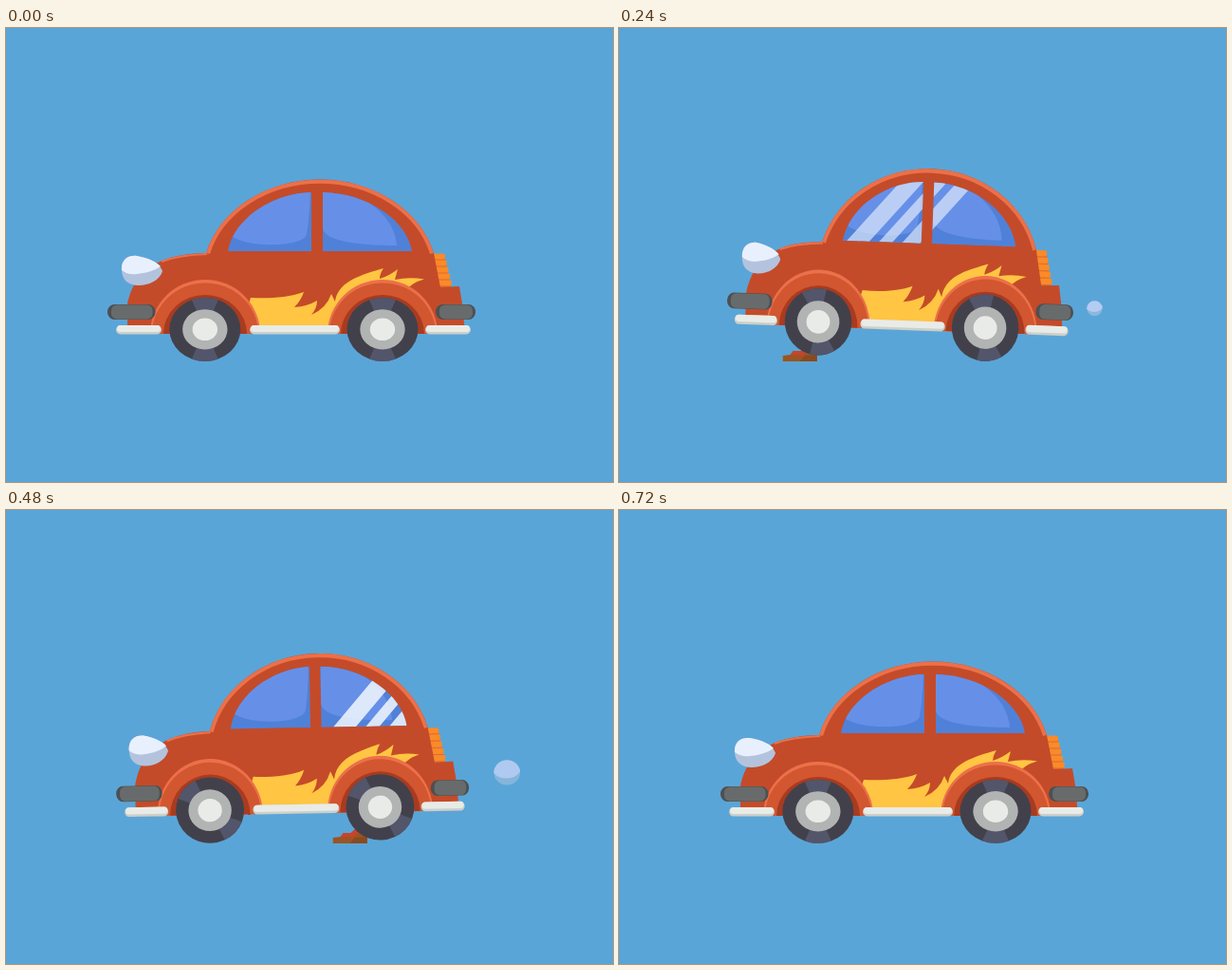
Write an HTML page that moves like this. It is 640 px wide and 478 px high and loops after 0.75 s.

```html
<!DOCTYPE html>
<html lang="en">
<head>
<meta charset="utf-8">
<title>Bumpy ride</title>
<style>
html, body { margin: 0; width: 100%; height: 100%; overflow: hidden; background: #5aa5d7; }
svg { display: block; width: 100%; height: 100%; }
</style>
</head>
<body>
<svg viewBox="0 0 640 478">
  <defs>
    <clipPath id="glass">
      <path d="M234 235C240 200 282 174 322 173V235Z"/>
      <path d="M334 173C382 174 423 203 428 235H334Z"/>
    </clipPath>
    <clipPath id="ball"><circle r="1"/></clipPath>
    <g id="tyre">
      <circle r="37.5" fill="#42414b"/>
      <path d="M0 0L34.8 -14A37.5 37.5 0 0 1 34.8 14ZL-34.8 -14A37.5 37.5 0 0 0 -34.8 14Z" fill="#53556b"/>
    </g>
    <g id="hub">
      <circle r="23.7" fill="#b2b4b3"/>
      <circle r="13.2" fill="#e9ebe9"/>
    </g>
    <g id="fender">
      <path d="M-58 0A58 57 0 0 1 58 0Z" fill="#ec7049"/>
      <path d="M-56 0A56 53.5 0 0 1 56 0Z" fill="#d2562f"/>
      <path d="M-44 0A44 41 0 0 1 44 0Z" fill="#a83b20"/>
    </g>
  </defs>

  <rect width="640" height="478" fill="#5aa5d7"/>

  <g id="puff">
    <g clip-path="url(#ball)">
      <circle id="puffLow" r="1"/>
      <ellipse id="puffTop" cx="-.05" cy="-.4" rx="1.1" ry=".85"/>
    </g>
  </g>

  <g id="rock">
    <path d="M0 15V9L8 8L11 4L19 4L23 0H31L36 8V15Z" fill="#9a5522"/>
    <path d="M23 9L36 8V15H18Z" fill="#8a4a1e"/>
    <path d="M7 9L11 4L19 4L23 1L28 2L21 9L13 8Z" fill="#c8442c"/>
  </g>

  <g id="car">
    <g id="vents"></g>
    <path d="M128 322V290C133 268 146 238 211 237A124 103.5 0 0 1 451 237L458 273L478 272L481 290L484 322Z" fill="#c44b29"/>
    <path d="M213 237.500A122 101.5 0 0 1 449 237.500" fill="none" stroke="#ec7049" stroke-width="4"/>
    <path d="M164 246Q182 239 212 238" fill="none" stroke="#ec7049" stroke-width="2"/>

    <g clip-path="url(#glass)">
      <rect x="230" y="170" width="200" height="66" fill="#5081d8"/>
      <path d="M230 170H321Q320 200 317 217C315 230 262 232 241 221L230 215Z" fill="#6690e8"/>
      <path d="M334 170H352C388 181 410 203 412 229C380 229 336 226 334 211Z" fill="#6690e8"/>
      <path id="shine" fill="#f4f8ff"/>
    </g>

    <path d="M248 315L258 284C276 285 298 284 314 278Q311 287 304 294Q318 293 328 287Q328 295 322 302Q338 295 343 280L347 288C350 268 370 261 398 253Q394 259 394 264Q404 261 413 254L410 265Q425 262 441 264.500Q428 268 422 276L400 300L355 315Z" fill="#ffc543"/>

    <use href="#fender" x="210" y="322"/>
    <use href="#fender" x="397" y="322"/>

    <path d="M122 255C121 244 129 239 138 240C152 242 163 249 165 256C162 266 150 271 140 271C128 271 122 264 122 255Z" fill="#b3c3de"/>
    <path d="M122 255C121 244 129 239 138 240C150 242 160 247 163 251C154 257 146 258 138 259Q128 260 122 255Z" fill="#e9f0fd"/>

    <g id="sills"></g>
    <g class="wheel" transform="translate(209.800 317.300) scale(1 .893)"><use href="#tyre"/><use href="#hub"/></g>
    <g class="wheel" transform="translate(397 317.300) scale(1 .893)"><use href="#tyre"/><use href="#hub"/></g>
    <g id="bumpers"></g>
  </g>
</svg>
<script>
const LOOP = 750, STEP = 30, RIDE = 720;
const MID = 303.25, AXLE = 317.25, BASE = 187.2;
const $ = id => document.getElementById(id);
const clamp = v => Math.min(1, Math.max(0, v));

// Bell curve around a moment
const bump = (t, mid, width) => Math.exp(-(((t - mid) / width) ** 2));

const mix = (a, b, k) => `rgb(${a.map((c, i) => Math.round(c + (b[i] - c) * k))})`;

const bar = (x, y, w, h, r, fill) =>
  `<rect x="${x}" y="${y}" width="${w}" height="${h}" rx="${r}" fill="${fill}"/>`;

// Diagonal band given by its left and right edge on the lower window line
const band = (l, r) => `M${l} 235H${r}L${r + 66} 165H${l + 66}Z`;

const sill = (x, w) =>
  bar(x, 313, w, 9.5, 4.7, "#cccfca") + bar(x + 1, 313, w - 2, 7, 3.5, "#e9ebe7");
const bumper = (x, w) =>
  bar(x, 291, w, 16, 7.5, "#4c5052") + bar(x + 4, 291.5, w - 7, 15, 6, "#686b6b");

function vents() {
  let s = '<path d="M446 238H462L469 273H450Z" fill="#de6a2a"/>';
  for (let i = 0; i < 5; i++) s += bar(446 + i * 1.7, 237.5 + i * 7, 17, 6, 1.5, "#fa8a2a");
  return s;
}

$("sills").innerHTML = sill(116, 48) + sill(257, 95) + sill(442, 48);
$("bumpers").innerHTML = bumper(107, 50.5) + bumper(453, 42);
$("vents").innerHTML = vents();

const tyres = document.querySelectorAll(".wheel use:first-child");

function drawCar(t) {
  // Stretch up in mid ride; each axle is thrown up as it meets the rock
  const stretch = Math.sin(Math.PI * (t / RIDE) ** 0.85) ** 2;
  const sx = 1 - 0.066 * stretch, sy = 1 + 0.054 * stretch;
  const front = bump(t, 268, 80), rear = bump(t, 550, 80);
  const x = MID - 6 * front + 3 * rear;
  const y = AXLE - 33.5 * (sy - 1) - 3.6 * (front + rear);
  const tilt = Math.atan2(7.2 * (front - rear), BASE * sx) * 180 / Math.PI;
  $("car").setAttribute("transform",
    `translate(${x} ${y}) rotate(${tilt}) scale(${sx} ${sy}) translate(${-MID} ${-AXLE})`);

  const spin = 90 - t + 55 * bump(t, 220, 70) + 75 * bump(t, 490, 70);
  tyres.forEach(w => w.setAttribute("transform", `rotate(${spin})`));

  const s = 130 + 0.452 * t;
  $("shine").setAttribute("d", band(s, s + 25) + band(s + 36, s + 51) + band(s + 62, s + 82));
  $("shine").setAttribute("opacity", clamp(0.92 * Math.sqrt(t / 570)));
}

function drawRock(t) {
  const x = 27 + 0.664 * t - 33 * bump(t, 320, 85);
  $("rock").setAttribute("transform", `translate(${x} 336)`);
  $("rock").setAttribute("opacity", clamp(t / 60) * clamp((700 - t) / 70));
}

function drawPuff(t) {
  const u = t / 570, r = 6.5 + 10.5 * u * u, white = bump(t, 355, 130);
  $("puff").setAttribute("transform",
    `translate(${494 + 50 * u ** 2.2} ${298 - 36 * u ** 3}) scale(${r} ${r * 0.95})`);
  $("puff").setAttribute("opacity", clamp(t / 60) * clamp((660 - t) / 90));
  $("puffTop").setAttribute("fill", mix([140, 176, 234], [230, 238, 252], white));
  $("puffLow").setAttribute("fill", mix([100, 168, 215], [184, 200, 225], white));
}

function tick() {
  const t = Math.floor(performance.now() % LOOP / STEP) * STEP;
  drawCar(t);
  drawRock(t);
  drawPuff(t);
  requestAnimationFrame(tick);
}
tick();
</script>
</body>
</html>
```
